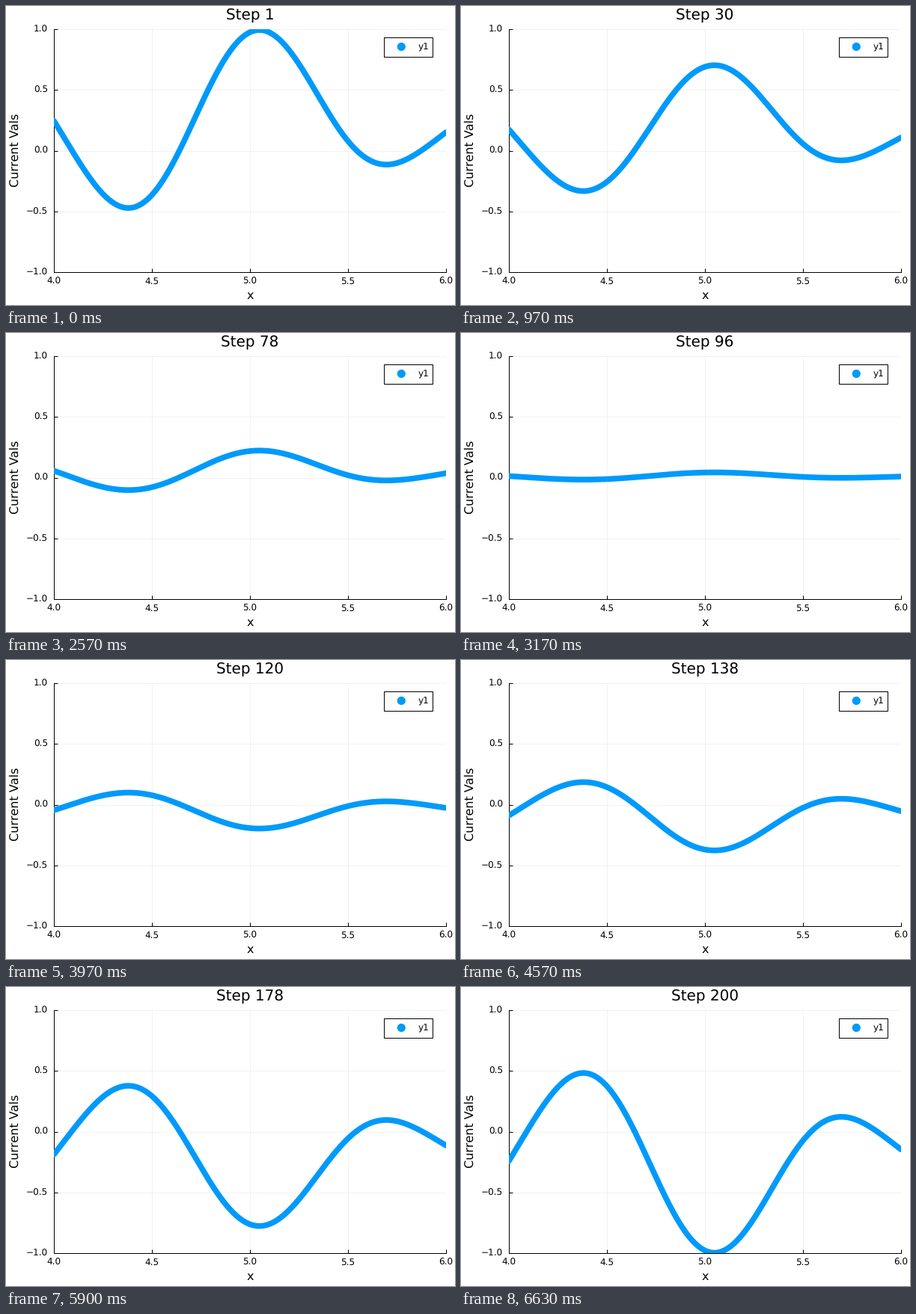
These frames come from a looping animation (600 px wide and 400 px high, 6.66 s). A matplotlib script:

```python
import numpy as np
import matplotlib.pyplot as plt
from matplotlib.animation import FuncAnimation
from matplotlib.patches import Circle, Rectangle

W, H, DPI = 600, 400, 100
LEFT, RIGHT, TOP, BOTTOM = 64, 588, 31, 356
STEPS, LOOP_MS = 200, 6660
BLUE = "#009afa"
PT = 72 / DPI  # points per pixel

plt.rcParams.update({"font.family": "DejaVu Sans", "text.hinting": "none",
                     "text.hinting_factor": 1})
fig = plt.figure(figsize=(W / DPI, H / DPI), dpi=DPI, facecolor="white")


def label(x, y, text, px, ha="center", **kw):
    """Place text by its baseline, in pixels from the top left."""
    return fig.text(x / W, 1 - y / H, text, fontsize=px * PT, ha=ha,
                    va="baseline", color="black", **kw)


def basis(x):
    u = x - 5
    c, s = np.cos(4.8 * u), np.sin(4.8 * u)
    return np.stack([u**0, u, u**2, c, s, u * c, u * s, u**2 * c, u**2 * s],
                    axis=-1)


def fit_wave():
    """Smooth wave through a few values, flat at its three extrema."""
    points = {4: .245, 4.09: 0, 4.38: -.48, 4.64: 0, 5.048: 1,
              5.555: 0, 5.695: -.12, 5.882: 0, 6: .15}
    xs, ys = np.array(list(points)), np.array(list(points.values()))
    weight = np.where(ys == 0, 0.3, 1)
    flat, h = np.array([4.38, 5.048, 5.695]), 1e-4
    slopes = (basis(flat + h) - basis(flat - h)) / (2 * h)
    rows = np.vstack([basis(xs) * weight[:, None], 0.2 * slopes])
    goal = np.concatenate([ys * weight, np.zeros(len(flat))])
    return np.linalg.lstsq(rows, goal, rcond=None)[0]


x = np.linspace(4, 6, 500)
wave = basis(x) @ fit_wave()

ax = fig.add_axes([LEFT / W, 1 - BOTTOM / H,
                   (RIGHT - LEFT) / W, (BOTTOM - TOP) / H])
ax.set(xlim=(4, 6), ylim=(-1, 1))
ax.set_xticks(np.linspace(4, 6, 5))
ax.set_yticks(np.linspace(-1, 1, 5))
ax.tick_params(direction="in", length=5 * PT, width=PT,
               labelbottom=False, labelleft=False)
ax.grid(color="black", alpha=0.05, lw=PT)
ax.set_axisbelow(True)
for side in ("left", "bottom"):
    ax.spines[side].set_linewidth(PT)
for side in ("top", "right"):
    ax.spines[side].set_visible(False)

for i in range(5):
    vx, vy = 4 + i / 2, -1 + i / 2
    label(LEFT + 131 * i, 371.5, f"{vx:.1f}", 11.65)
    label(55.8, 359.7 - 81.25 * i, f"{vy:.1f}".replace("-", "\u2212"),
          11.65, ha="right")
label(326, 391.5, "x", 16)
label(16.5, 193, "Current Vals", 16, rotation=90, rotation_mode="anchor")
title = label(326, 18.5, "", 20.4)

# The wave sits half a pixel low, on pixel centres
shift = 0.5 / (BOTTOM - TOP) * 2
curve, = ax.plot([], [], color=BLUE, lw=7.6 * PT, zorder=5,
                 solid_capstyle="round", solid_joinstyle="round")

# Legend, in pixel coordinates on top of the plot
top = fig.add_axes([0, 0, 1, 1], zorder=3)
top.set(xlim=(0, W), ylim=(H, 0))
top.axis("off")
top.add_patch(Rectangle((505, 42), 65, 26, fc="white", ec="black", lw=PT))
top.add_patch(Circle((528.3, 54.5), 5.6, fc=BLUE, lw=0))
top.text(551, 58.8, "y1", fontsize=11.65 * PT, va="baseline")


def update(i):
    step = i + 1
    title.set_text(f"Step {step}")
    curve.set_data(x, wave * (1 - step / 100) + shift)
    return title, curve


anim = FuncAnimation(fig, update, frames=STEPS, interval=LOOP_MS / STEPS,
                     repeat=True, repeat_delay=0, blit=False)
plt.show()
```
